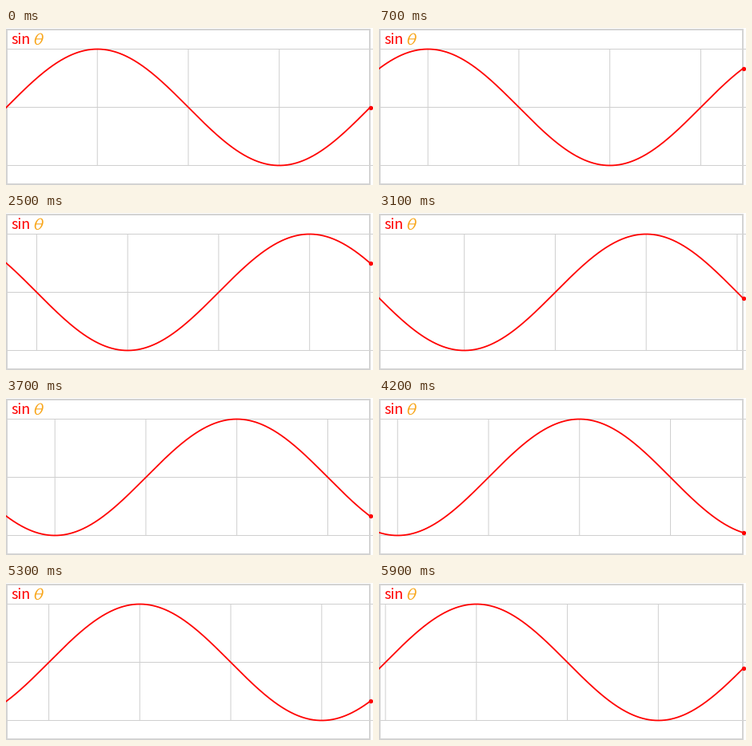
A matplotlib script for the animation above (6000 ms loop, 459x197 px).

```python
import numpy as np
import matplotlib.pyplot as plt
from matplotlib.animation import FuncAnimation

W, H, DPI = 459, 197, 100
PX = 72 / DPI                    # points per pixel
FRAMES, INTERVAL = 60, 100
PERIOD, AMP, MID = 455, 73, 99.5
HALF = 0.5                       # whole coordinates lie on pixel centres
GRID, BORDER, RED, ORANGE = "#cfcfcf", "#d3d3d3", "#ff0000", "#f9a61a"

fig = plt.figure(figsize=(W / DPI, H / DPI), dpi=DPI, facecolor="white")
ax = fig.add_axes([0, 0, 1, 1])
ax.set(xlim=(0, W), ylim=(H, 0))
ax.axis("off")


def line(x, y, color, width, **kw):
    return ax.plot(x, y, color=color, lw=width * PX, snap=False, **kw)[0]


def draw_theta(cx, cy, rx, ry, slant):
    """Slanted ring, thick at the sides, with a thin crossbar."""
    t = np.linspace(0, 2 * np.pi, 80)

    def oval(a, b):
        y = b * np.sin(t)
        return cx + a * np.cos(t) - slant * y, cy + y

    ox, oy = oval(rx, ry)
    ix, iy = oval(rx - 1.8, ry - 1)
    ax.fill(np.r_[ox, ix[::-1]], np.r_[oy, iy[::-1]],
            color=ORANGE, lw=0, zorder=5)
    line([cx - rx + 1, cx + rx - 1], [cy, cy], ORANGE, 1.1,
         solid_capstyle="butt", zorder=5)


# Fixed horizontal grid and panel border
for y in (MID - AMP, MID, MID + AMP):
    line([0, W], [y, y], GRID, 1, solid_capstyle="butt", zorder=1)
line([1, 455, 455, 1, 1], [2, 2, 196, 196, 2], BORDER, 2,
     solid_joinstyle="miter", solid_capstyle="projecting", zorder=2)

# Title
ax.text(6.3, 20, "sin", color=RED, family="Noto Sans CJK JP",
        size=18 * PX, va="baseline", zorder=5)
draw_theta(41.2, 13.8, 5.1, 7.3, 0.27)

# Moving parts
columns = [line([0, 0], [MID - AMP, MID + AMP], GRID, 1,
                solid_capstyle="butt", zorder=1) for _ in range(5)]
xs = np.linspace(-1, PERIOD, 457)
curve = line(xs + HALF, xs, RED, 1.8, zorder=3)
dot = line([PERIOD + HALF], [MID], RED, 0, marker="o", ms=5.4 * PX,
           mew=0, zorder=4)


def wave(x, shift):
    return MID - AMP * np.sin(2 * np.pi * (x + shift) / PERIOD)


def update(i):
    shift = PERIOD * i / FRAMES
    step = PERIOD / 4
    for k, col in enumerate(columns):
        x = k * step - shift % step
        col.set_xdata([x + HALF, x + HALF])
        col.set_visible(x >= 0)
    curve.set_ydata(wave(xs, shift))
    dot.set_ydata([wave(PERIOD, shift)])
    return [*columns, curve, dot]


anim = FuncAnimation(fig, update, frames=FRAMES, interval=INTERVAL,
                     repeat=True, repeat_delay=0)
plt.show()
```
